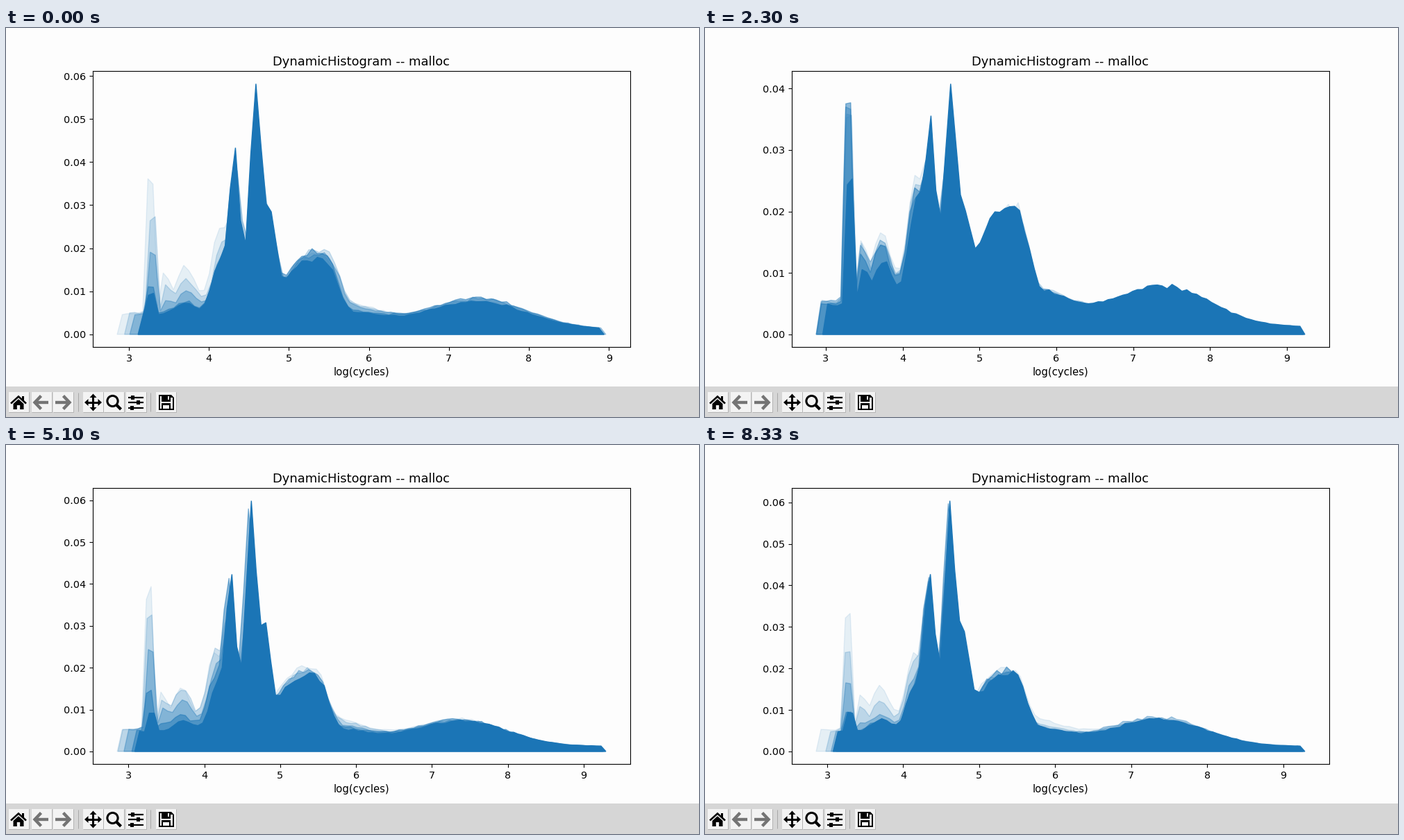
Write a matplotlib script that moves like this. It is 998 px wide and 561 px high and loops after 8360 ms.

```python
import numpy as np
import matplotlib.pyplot as plt
from matplotlib.animation import FuncAnimation
from matplotlib.patches import Circle, Polygon, Rectangle
from matplotlib.ticker import MultipleLocator

W, H, DPI = 998, 561, 100
FRAMES, INTERVAL = 220, 38
HOLD = 5                            # frames per histogram update
ALPHAS = (0.1, 0.2, 0.35, 0.5, 1)   # oldest to newest
BLUE, PAPER, BAR = "#1b75b6", "#fdfdfd", "#d6d6d6"

BIN, ANCHOR, FLOOR = 0.064, 4.6, 0.0012

# center, width, sharpness, height when slow and when fast (1e-4)
PEAKS = np.array([
    (3.00, 1.00, 8, 35, 40),
    (3.29, 0.07, 4, 50, 330),
    (3.47, 0.05, 2, 0, 100),
    (3.72, 0.18, 2, 30, 110),
    (4.14, 0.11, 2, 55, 100),
    (4.33, 0.085, 2, 300, 120),
    (4.43, 0.45, 4, 110, 150),
    (4.60, 0.092, 2, 460, 140),
    (4.79, 0.10, 2, 190, 20),
    (5.28, 0.37, 4, 140, 140),
    (5.70, 0.64, 2, 40, 60),
    (7.35, 0.88, 2, 65, 65),
])

# Updates at which the allocator swaps between fast and slow
FLIPS = (-2.4, 3.7, 12.3, 17.6, 24, 32.3, 40.2)
FADE = 4


def smoothstep(t):
    t = np.clip(t, 0, 1)
    return t * t * (3 - 2 * t)


def fastness(n):
    """1 in the fast state, 0 in the slow one, eased around each flip."""
    return 1 - sum((-1) ** k * smoothstep((n - f) / FADE + 0.5)
                   for k, f in enumerate(FLIPS))


def outline(n):
    """Histogram polygon after update n; its range widens with the data."""
    rng = np.random.default_rng(n + 10)
    w = fastness(n)
    left = 3.13 - 0.23 * w + rng.uniform(-0.03, 0.03)
    right = 9.25 - 0.3 * np.exp(-n / 8) + rng.uniform(-0.03, 0.03)
    first, last = np.ceil((np.array([left, right]) - ANCHOR) / BIN)
    x = ANCHOR + BIN * np.arange(first, last)

    center, width, sharp, slow, fast = PEAKS.T[..., None]
    height = (slow + (fast - slow) * w) * 1e-4
    height = height * rng.normal(1, 0.05, height.shape)
    y = FLOOR + (height * np.exp(-abs((x - center) / width) ** sharp)).sum(0)
    y *= rng.normal(1, 0.025, x.size)
    x += rng.uniform(-0.025, 0.025)
    return np.c_[np.r_[x[0] - BIN, x, x[-1] + BIN], np.r_[0, y, 0]]


SHAPES = {n: outline(n) for n in range(-4, FRAMES // HOLD)}

plt.rcParams["font.family"] = "DejaVu Sans"
plt.rcParams["toolbar"] = "None"
fig = plt.figure(figsize=(W / DPI, H / DPI), dpi=DPI, facecolor=PAPER)

ax = fig.add_axes([124.9 / W, (H - 460) / H, 774.2 / W, 397.6 / H],
                  facecolor=PAPER)
ax.set_title("DynamicHistogram -- malloc", fontsize=12.9)
ax.set_xlabel("log(cycles)", fontsize=10.7)
ax.tick_params(labelsize=10.4)
ax.xaxis.set_major_locator(MultipleLocator(1))
ax.yaxis.set_major_locator(MultipleLocator(0.01))
ax.xaxis.set_major_formatter("{x:.0f}")
ax.yaxis.set_major_formatter("{x:.2f}")
layers = [ax.add_patch(Polygon([(0, 0), (1, 0), (1, 1)], fc=BLUE, ec=BLUE,
                               lw=1, alpha=a, zorder=1 + 0.1 * i))
          for i, a in enumerate(ALPHAS)]

# Toolbar, in pixels from the top left corner
ui = fig.add_axes([0, 0, 1, 1], xlim=(0, W), ylim=(H, 0))
ui.axis("off")
INK, FADED, KEY = "black", "#747474", "#f3f3f3"


def box(x, y, w, h, color=INK):
    ui.add_patch(Rectangle((x, y), w, h, fc=color, ec="none"))


def shape(*pts, color=INK):
    ui.add_patch(Polygon(pts, fc=color, ec="none"))


def stroke(*pts, px=2, color=INK):
    ui.plot(*zip(*pts), color=color, lw=px * 72 / DPI,
            solid_capstyle="butt", solid_joinstyle="miter")


box(0, 517, W, 44, BAR)
for x in (4, 37, 68, 111, 141, 173, 216):
    box(x, 525, 29, 29, KEY)
    stroke((x, 554), (x + 29, 554), (x + 29, 525), px=1, color="#b4b4b4")
for x in (104.5, 208.5):
    stroke((x, 526), (x, 553), px=1, color="#a8a8a8")

# home
stroke((7, 541.5), (18, 531.5), (29, 541.5), px=2.6)
box(23, 531, 3, 6)
shape((10.5, 542), (18, 535.2), (25.5, 542), (25.5, 550), (20.2, 550),
      (20.2, 544), (15.8, 544), (15.8, 550), (10.5, 550))
# back, forward
for cx, s in ((50.5, -1), (82.5, 1)):
    stroke((cx, 530.5), (cx + 9 * s, 540), (cx, 549.5), px=4.4, color=FADED)
    stroke((cx - 11 * s, 540), (cx + 8 * s, 540), px=4.4, color=FADED)
# pan
stroke((117, 540), (134, 540), px=3)
stroke((125.5, 531), (125.5, 549), px=3)
for s in (-1, 1):
    shape((125.5 + 12.5 * s, 540), (125.5 + 7 * s, 535), (125.5 + 7 * s, 545))
    shape((125.5, 540 + 12.5 * s), (120.5, 540 + 7 * s), (130.5, 540 + 7 * s))
# zoom
ui.add_patch(Circle((153.5, 538), 7.6, fc="none", ec=INK, lw=2.2))
stroke((158.5, 543), (165.5, 550), px=4.2)
# sliders
for y, x in ((532.5, 183), (540, 191), (547.5, 182)):
    stroke((176, y), (198, y), px=2.2)
    box(x - 2.5, y - 3, 5, 6)
# save
shape((220, 529), (238, 529), (242, 533), (242, 551), (220, 551))
box(222, 531, 2.5, 18, KEY)
box(237.5, 533, 2.5, 16, KEY)
box(224.5, 538.5, 13, 2.5, KEY)
box(226.5, 543.5, 9, 5.5, KEY)
box(233, 531, 2.5, 5, KEY)


def update(i):
    n = i // HOLD
    shown = [SHAPES[k] for k in range(n - 4, n + 1)]
    for layer, xy in zip(layers, shown):
        layer.set_xy(xy)
    lo = min(s[0, 0] for s in shown)
    hi = max(s[-1, 0] for s in shown)
    top = max(s[:, 1].max() for s in shown)
    pad = 0.05 * (hi - lo)
    ax.set_xlim(lo - pad, hi + pad)
    ax.set_ylim(-0.05 * top, 1.05 * top)
    return layers


anim = FuncAnimation(fig, update, frames=FRAMES, interval=INTERVAL,
                     repeat=True, repeat_delay=0, blit=False)
plt.show()
```
